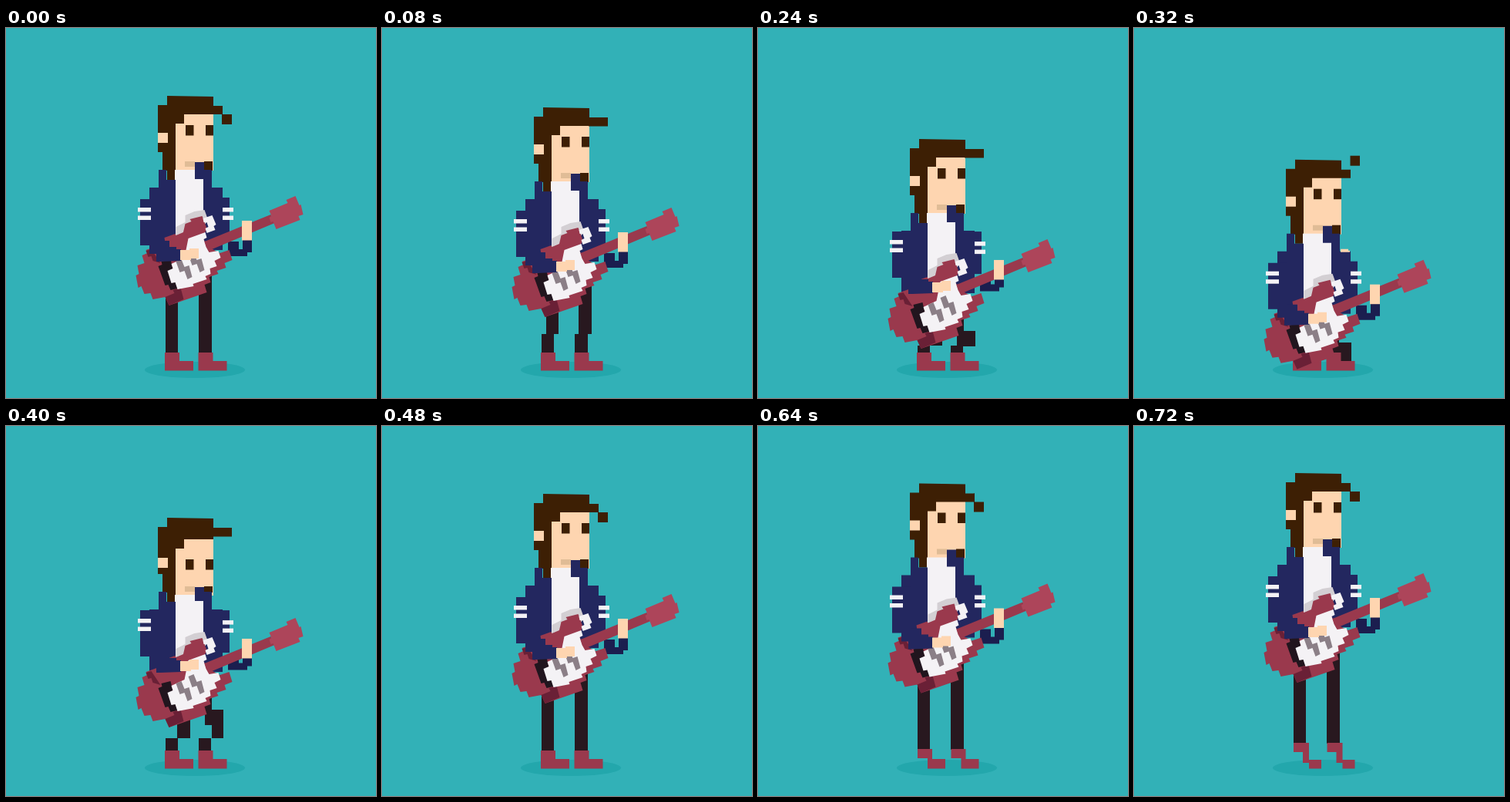
An HTML page with a canvas that plays this animation: 480 by 480 pixels, repeating every 800 ms.

```html
<!DOCTYPE html>
<html lang="en">
<head>
<meta charset="utf-8">
<title>Pixel guitarist</title>
<style>
  html, body { margin: 0; width: 100%; height: 100%; overflow: hidden; background: #32b1b7; }
  canvas { display: block; width: 480px; height: 480px; }
</style>
</head>
<body>
<canvas id="stage" width="480" height="480"></canvas>
<script>
const ctx = document.getElementById('stage').getContext('2d');
const STEP = 80;

const C = {
  bg: '#32b1b7', shadow: '#23a7ac', hair: '#3d1f04', skin: '#fed5b0', chin: '#e0bc96',
  navy: '#23275f', cuff: '#1b1e4f', white: '#f4f2f5', grey: '#d3cfd3', pants: '#28181f',
  red: '#9a394d', pale: '#ad455a', wine: '#6a2036', black: '#21151e', bolt: '#8b7f87'
};

// y: body drop, arm: shoulder lift, hair: lock pose, nod: lowered face
const poses = [
  { y: 0, hair: 'hang', legs: 'straight', boot: 'flat' },
  { y: 15, hair: 'out', legs: 'soft', boot: 'flat' },
  { y: 31, hair: 'out', legs: 'bent', boot: 'flat', arm: 14 },
  { y: 56, hair: 'out', legs: 'low', boot: 'flat', arm: 14 },
  { y: 82.7, hair: 'fly', legs: 'squat', boot: 'flat' },
  { y: 31, hair: 'out', legs: 'bent', boot: 'flat', arm: 14, nod: 4 },
  { y: 0, hair: 'hang', legs: 'straight', boot: 'flat' },
  { y: -7, hair: 'hang', legs: 'straight', boot: 'flat' },
  { y: -13.5, hair: 'hang', legs: 'straight', boot: 'heel' },
  { y: -27, hair: 'hang', legs: 'straight', boot: 'toe' }
];

const boots = {
  flat: [421, 'M206 421H225V432H243V444.5H206Z'],
  heel: [419, 'M207 419H226V432H243V444.5H220V431H207Z'],
  toe: [411, 'M207 411H227V433H243V444.5H227V437H219V423H207Z']
};

const locks = {
  hang: 'M280 101V125H293V112H281V101Z',
  out: 'M268 101H293V112.5H268Z',
  fly: 'M280.5 83H293V96H280.5Z'
};

function path(color, d) {
  ctx.fillStyle = color;
  ctx.fill(new Path2D(d));
}

function box(color, x1, y1, x2, y2) {
  ctx.fillStyle = color;
  ctx.fillRect(x1, y1, x2 - x1, y2 - y1);
}

function shifted(dx, dy, draw) {
  ctx.save();
  ctx.translate(dx, dy);
  draw();
  ctx.restore();
}

function drawLegs({ y, legs, boot }) {
  const [top, shape] = boots[boot];
  const leg = (...r) => box(C.pants, ...r);
  if (legs === 'straight') {
    leg(207, y + 335, 223, top + 1);
    leg(250, y + 312, 267, top + 1);
  } else if (legs === 'soft') {
    leg(213, y + 330, 229, 397);
    leg(207, 397, 223, 422);
    leg(255, y + 312, 272, 397);
    leg(250, 397, 267, 422);
  } else if (legs === 'squat') {
    path(C.pants, 'M250 398H266V408H282V433H265V421H250Z');
  } else {
    const knee = legs === 'bent' ? 405 : 412;
    leg(222, y + 330, 239, knee);
    leg(207, knee, 223, 422);
    leg(250, y + 312, 267, y + 338);
    leg(258, y + 337, 282, y + 357);
    leg(267, y + 356, 282, knee);
    leg(250, knee, 266, 422);
  }
  path(C.red, shape);
  shifted(43.5, 0, () => path(C.red, shape));
}

function drawHead({ hair, nod = 0 }) {
  box(C.skin, 219, 110, 269, 185 + nod);
  path(C.hair, `M209 88L269 89V101H281V112H269V${112 + nod}H231V${124 + nod}H220V197H209V185H203V161H197V100H209Z`);
  path(C.hair, locks[hair]);
  box(C.skin, 197, 136 + nod, 210, 149 + nod);
  const eye = 126 + nod * 4;
  box(C.hair, 233, eye, 243.5, eye + 13.5);
  box(C.hair, 259, eye, 269, eye + 13.5);
  box(C.chin, 232, 173 + nod, 245, 180 + nod);
  box(C.hair, 257, 173 + nod, 268, 185);
}

function drawTorso(lift, nod) {
  box(C.white, 219, 184 + nod, 257, 290);
  path(C.navy, 'M198 184H208V197H220V290H186V207H198Z');
  path(C.navy, `M245 ${174 + nod}H257V184H267V207H281V288H256V196H245Z`);
  shifted(0, -lift * 0.85, () => {
    box(C.navy, 278, 220, 290, 275);
    box(C.white, 281, 233, 295, 238.5);
    box(C.white, 281, 243.5, 295, 249);
  });
}

function drawGuitar() {
  path(C.grey, 'M220 256L232 250V241L244 236L257 234L262 248L240 270H220Z');
  // body
  path(C.red, 'M176 293L183 290L181 286L206 277L205 270L219 265L220 267L232 262L246 257L262 282L277 290L289 286L293 299L283 303L285 309L273 313L275 317L263 321L265 328L257 331L260 341L211 358L206 347L190 350L187 342L179 343L175 333L171 335L168 319L172 317L170 306L179 303Z');
  path(C.wine, 'M206 347L218 342L216 338L226 335L230 350L211 358Z');
  path(C.wine, 'M181 287L188 285L200 303L190 300L188 294L184 295Z');
  path(C.black, 'M197 307L202 305L201 301L213 298L218 319L228 325L230 334L213 338L210 331L206 332Z');
  // horn
  path(C.red, 'M232 252L240 249L238 246L254 242L260 258L257 265L237 273L235 266L229 265Z');
  // pickguard
  path(C.white, 'M255 245L267 241L272 253L269 255L271 260L260 264L258 258L262 256L260 250H256Z');
  path(C.white, 'M236 271L258 263L260 270L256 272L259 282L263 289L275 287L278 296L270 300L273 307L264 310L265 317L258 320L260 324L242 330L243 333L222 337L219 328L214 329L209 313L216 310L214 304L231 296Z');
  const bolt = 'M220 301L227 298L231 308L237 306L241 321L235 324L231 313L225 315Z';
  path(C.bolt, bolt);
  shifted(16, -9, () => path(C.bolt, bolt));
  // neck and headstock
  path(C.red, 'M257 275L343 240L348 251L262 287Z');
  path(C.pale, 'M341 235L365 225L363 221L375 216L380 228L382 227L385 240L379 242L381 247L350 259L346 249L343 250L341 244L344 242Z');
}

function drawFretHand(lift) {
  shifted(0, -lift * 0.75, () =>
    path(C.cuff, 'M307 275H319V291H313V296H288V277H302V287H307Z'));
}

function drawFingers(lift) {
  shifted(0, -lift * 0.36, () => box(C.skin, 306, 250, 319, 275.5));
}

function drawPickArm(lift) {
  shifted(0, -lift, () => {
    path(C.navy, 'M174 222H199V276H212V284H221V287H227V302L200 303H195V293H186V282H174Z');
    box(C.white, 171, 233, 188, 238.5);
    box(C.white, 171, 243.5, 188, 249);
    path(C.skin, 'M226 288H238V286H250V299H240V301H226Z');
  });
}

function draw(pose) {
  const { arm = 0, nod = 0 } = pose;
  box(C.bg, 0, 0, 480, 480);
  ctx.fillStyle = C.shadow;
  ctx.beginPath();
  ctx.ellipse(245, 443.5, 65, 10.5, 0, 0, Math.PI * 2);
  ctx.fill();
  drawLegs(pose);
  shifted(0, pose.y, () => {
    drawHead(pose);
    drawTorso(arm, nod);
    if (pose.hair === 'fly') path(C.skin, 'M268 204H278V206H280V208H268Z');
    drawFretHand(arm);
    shifted(0.5, 2, drawGuitar);
    drawFingers(arm);
    drawPickArm(arm);
  });
}

const start = performance.now();
function tick() {
  const t = Math.max(0, performance.now() - start);
  draw(poses[Math.floor(t / STEP) % poses.length]);
  requestAnimationFrame(tick);
}
tick();
</script>
</body>
</html>
```
